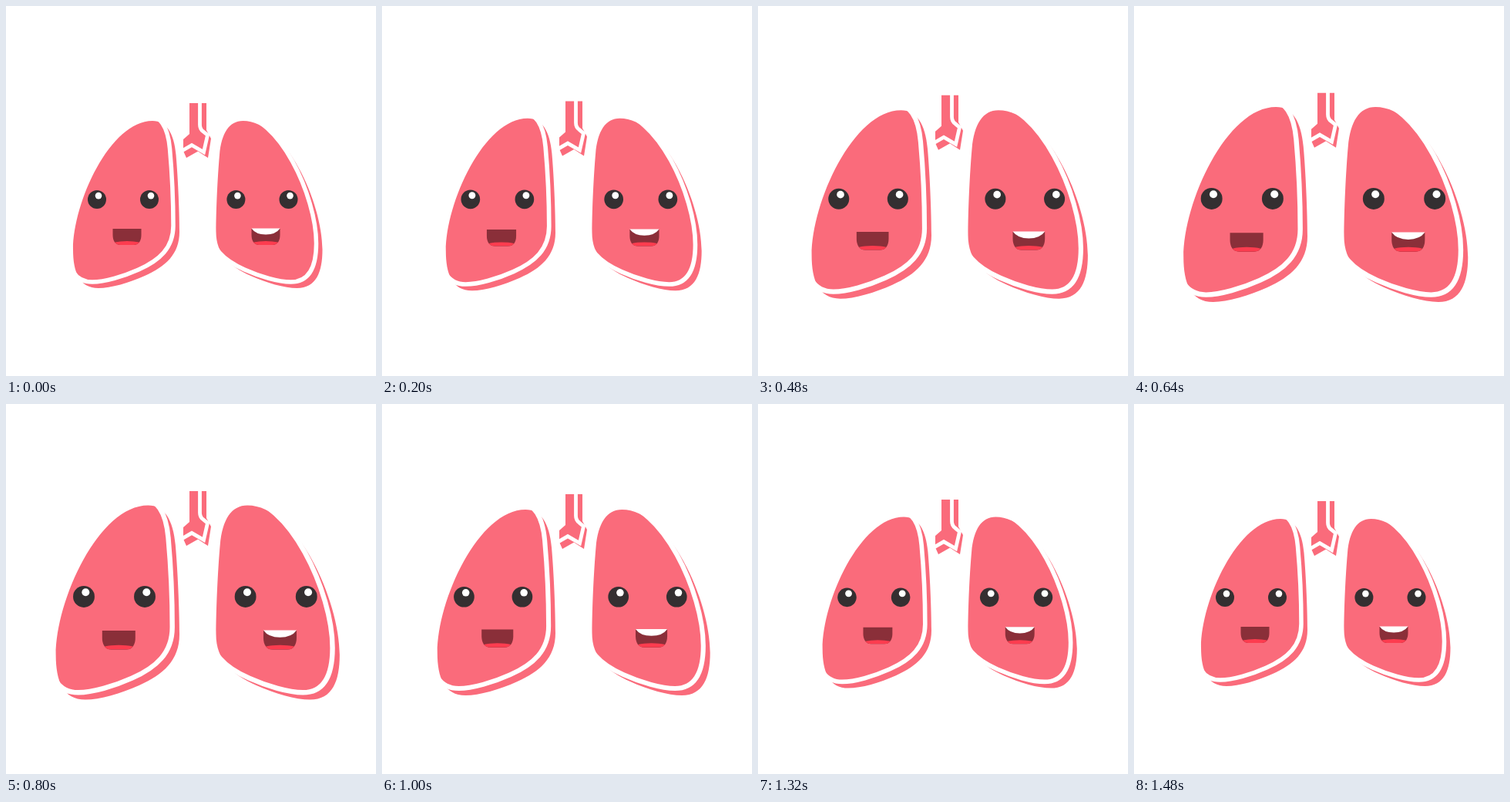
Write an HTML page without scripts that moves like this. It is 480 by 480 pixels and loops after 2920 ms.

```html
<!DOCTYPE html>
<html lang="en">
<head>
<meta charset="utf-8">
<title>Breathing lungs</title>
<style>
  @property --breath { syntax: "<number>"; inherits: true; initial-value: 1; }

  html, body { margin: 0; width: 100%; height: 100%; overflow: hidden; background: #fff; }
  svg { display: block; width: 100%; height: 100%; animation: breathe 2920ms linear infinite; }

  /* one step per 40 ms tick */
  @keyframes breathe {
    0%       { --breath: 1;     animation-timing-function: steps(4); }
    5.4795%  { --breath: 1.018; animation-timing-function: steps(4); }
    10.9589% { --breath: 1.067; animation-timing-function: steps(4); }
    16.4384% { --breath: 1.126; animation-timing-function: steps(2); }
    19.1781% { --breath: 1.152; animation-timing-function: steps(4); }
    24.6575% { --breath: 1.178; animation-timing-function: steps(2); }
    27.3973% { --breath: 1.162; animation-timing-function: steps(5); }
    34.2466% { --breath: 1.11;  animation-timing-function: steps(4); }
    39.726%  { --breath: 1.066; animation-timing-function: steps(4); }
    45.2055% { --breath: 1.024; animation-timing-function: steps(4); }
    50.6849%, 100% { --breath: 1; }
  }

  .lung, .face { transform: scale(var(--breath)); }
  .lung { transform-origin: 225px 257.5px; }
  .lung.right { transform-origin: 272.5px 257.5px; }
  .face { transform-origin: 223px 257.5px; }
  .windpipe { transform: translateY(calc((1 - var(--breath)) * 81px)); }

  .pink { fill: #fa6b7b; }
  .line { fill: none; stroke: #fff; stroke-width: 5.5; }
  .windpipe .line { stroke-width: 4.8; }
  .dark { fill: #342f31; }
  .mouth { fill: #8a2f39; }
  .tongue { fill: #fd3c4f; }
  .white { fill: #fff; }
</style>
</head>
<body>
<svg viewBox="0 0 480 480">
  <defs>
    <path id="shape" d="M87 316C87 255 135 149 190 149C208 149 218 165 220.5 193C223 221 225 265 225 293C225 322 207 338 180 350C160 359 136 366 120 366C95 366 87 345 87 316Z"/>
    <g id="eye">
      <circle class="dark" r="12"/>
      <circle class="white" cx="2" cy="-4.9" r="4.3"/>
    </g>
    <path id="lips" d="M0 0H37V8C37 15 34 21 27 21H10C3 21 0 15 0 8Z"/>
    <clipPath id="inside"><use href="#lips"/></clipPath>
    <g id="mouth">
      <use class="mouth" href="#lips"/>
      <ellipse class="tongue" cx="18.5" cy="21.5" rx="22" ry="5.5" clip-path="url(#inside)"/>
    </g>
  </defs>

  <g class="windpipe">
    <path class="pink" d="M238 126H260V161L266 172L262 197L249 188.5L234 197L230 188V173L238 166Z"/>
    <path class="line" d="M251.5 125V154Q251.5 160 256 163L261.5 167.5L256.5 189.500L241 180.5L228 188"/>
  </g>

  <g class="lung">
    <use class="pink" href="#shape"/>
    <use class="line" href="#shape" x="-8" y="-8"/>
  </g>
  <g class="lung right">
    <use class="pink" href="#shape" transform="matrix(-1 0 0 1 497.5 0)"/>
    <use class="line" href="#shape" transform="matrix(-1 0 0 1 489.5 -8)"/>
  </g>

  <g class="face">
    <use href="#eye" x="118" y="251"/>
    <use href="#eye" x="186" y="251"/>
    <use href="#mouth" x="138.5" y="289"/>
    <use href="#eye" x="298.4" y="251"/>
    <use href="#eye" x="366.5" y="251"/>
    <use href="#mouth" x="318.5" y="289"/>
    <path class="white" d="M318.5 288.5H355.5Q350 296.5 337 296.500Q324 296.500 318.5 288.500Z"/>
  </g>
</svg>
</body>
</html>
```
